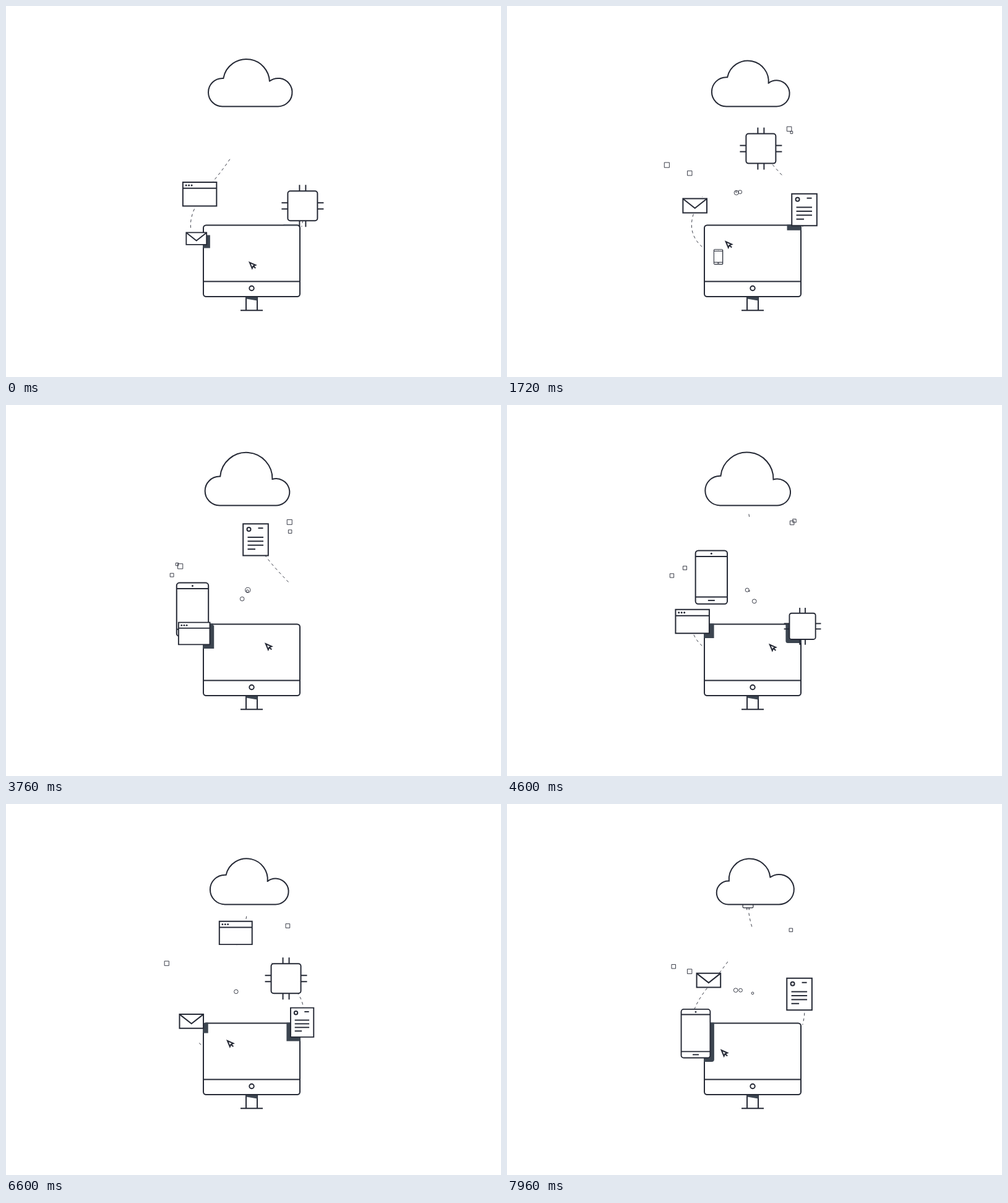
An HTML page with a canvas for the animation above (8 s loop, 800x600 px).

```html
<!DOCTYPE html>
<html lang="en">
<head>
<meta charset="utf-8">
<title>Cloud upload</title>
<style>
  html, body { margin: 0; width: 100%; height: 100%; overflow: hidden; background: #fff; }
  canvas { display: block; width: 800px; height: 600px; }
  svg { position: absolute; width: 0; height: 0; }
</style>
</head>
<body>
<canvas id="stage" width="800" height="600"></canvas>
<svg aria-hidden="true">
  <path id="left-route" d="M361 414Q326 402 309 378C297 361 297 338 306 317C316 292 384 220 390 140"/>
  <path id="right-route" d="M420 413C455 402 473 378 478 356C484 330 482 316 458 288C424 252 384 214 390 140"/>
  <path id="left-trail" d="M330 400C292 378 286 345 324 297C352 262 386 225 390 170"/>
</svg>
<script>
const find = id => document.getElementById(id);
const ctx = find('stage').getContext('2d');
const LOOP = 8000, CYCLE = 5640, TAU = Math.PI * 2;
const INK = '#262a36', SHADE = '#3c4550';

const clamp = v => Math.max(0, Math.min(1, v));
const mix = (a, b, u) => a + (b - a) * u;
const easeInOut = u => u < .5 ? 4 * u ** 3 : 1 - 4 * (1 - u) ** 3;
const since = (phase, start) => (phase - start + 2 * CYCLE) % CYCLE;

// ---- drawing helpers ----
function paint(build, fill) {
  ctx.beginPath();
  build();
  if (fill) { ctx.fillStyle = fill; ctx.fill(); }
  ctx.stroke();
}
const box = (w, h, r) => ctx.roundRect(-w / 2, -h / 2, w, h, r);
const line = (x1, y1, x2, y2) => paint(() => { ctx.moveTo(x1, y1); ctx.lineTo(x2, y2); });
const ring = (x, y, r) => paint(() => ctx.arc(x, y, r, 0, TAU));
function dot(x, y) {
  ctx.beginPath();
  ctx.arc(x, y, 1.5, 0, TAU);
  ctx.fillStyle = INK;
  ctx.fill();
}

// ---- travelling icons: pop out of the screen, drift, then speed up into the cloud ----
const left = { path: find('left-route'), life: 4070, jump: .212, power: 4, side: 1 };
const right = { path: find('right-route'), life: 4233, jump: .257, power: 3, side: -1 };
const DRIFT = .136;

const phone = { start: 1510, route: left, w: 51.4, h: 86.4, r: 4.5, detail() {
  line(-25.7, -33.7, 25.7, -33.7);
  line(-25.7, 32, 25.7, 32);
  line(-5.5, 37.5, 5.5, 37.5);
  dot(0, -38.3);
} };
const browser = { start: 2900, route: left, w: 54.5, h: 38.5, r: 0, detail() {
  line(-27, -9.3, 27, -9.3);
  for (let i = 0; i < 3; i++) dot(-22 + 4.5 * i, -14.2);
} };
const envelope = { start: 4950, route: left, w: 38.6, h: 22.8, r: 0, detail() {
  paint(() => { ctx.moveTo(-19, -11); ctx.lineTo(0, 4); ctx.lineTo(19, -11); });
} };
const chip = { start: 3860, route: right, w: 48, h: 48, r: 4, detail() {
  for (const p of [-5, 5]) for (const s of [-1, 1]) {
    line(p, 24 * s, p, 34 * s);
    line(24 * s, p, 34 * s, p);
  }
} };
const page = { start: 130, route: right, w: 40.6, h: 51.4, r: 0, detail() {
  ring(-11, -16.8, 3);
  line(4, -18.8, 12, -18.8);
  for (let i = 0; i < 4; i++) line(-13, -4 + 6.4 * i, i < 3 ? 12.5 : -.5, -4 + 6.4 * i);
} };
const icons = [phone, browser, envelope, chip, page];

function drawIcon({ route, w, h, r, detail }, age) {
  const { path, life, jump, power, side } = route;
  const pop = 1 - Math.exp(-((age / 450) ** 1.5));
  const scale = pop * clamp((life - age) / 380);
  if (scale < .01) return;
  const u = age / life;
  const progress = jump * pop + DRIFT * u + (1 - jump - DRIFT) * u ** power;
  const { x, y } = path.getPointAtLength(progress * path.getTotalLength());
  const drop = 6.7 * scale ** 2;

  // the shadow falls on the computer only
  ctx.save();
  ctx.beginPath();
  ctx.roundRect(318, 353.5, 158, 117.5, 5);
  ctx.clip();
  ctx.translate(x + side * drop, y + drop);
  ctx.scale(scale, scale);
  ctx.beginPath();
  box(w + 2, h + 2, r);
  ctx.fillStyle = SHADE;
  ctx.fill();
  ctx.restore();

  ctx.save();
  ctx.translate(x, y);
  ctx.scale(scale, scale);
  ctx.lineWidth = 2 / Math.sqrt(scale);
  paint(() => box(w, h, r), '#fff');
  detail();
  ctx.restore();
}

// ---- dashed trails, visible between a rising head and a rising tail ----
const shape = id => new Path2D(find(id).getAttribute('d'));
const leftTrail = {
  path: shape('left-trail'), bottom: 392,
  head: t => 1 - (1 - clamp((t - 900) / 2600)) ** 1.3,
  tail: t => clamp((t - 2200) / 1550),
};
const rightTrail = {
  path: shape('right-route'), bottom: 357,
  head: t => clamp((t - 900) / 3400) ** 1.4,
  tail: t => clamp((t - 2960) / 1700) ** 1.3,
};
const trails = [[leftTrail, 0], [leftTrail, 3230], [rightTrail, 0], [rightTrail, CYCLE - 2170]];

function drawTrail({ path, bottom, head, tail }, age) {
  const top = mix(bottom, 176, head(age)), end = mix(bottom, 176, tail(age));
  if (end <= top) return;
  ctx.save();
  ctx.beginPath();
  ctx.rect(250, top, 300, end - top);
  ctx.clip();
  ctx.setLineDash([4.5, 4.5]);
  ctx.stroke(path);
  ctx.restore();
}

// ---- particles: three clusters of small outlines that swell, drift and vanish ----
function seeded(seed) {
  return () => {
    seed = (seed * 16807) % 2147483647;
    return seed / 2147483647;
  };
}

function cluster(seed, count, x, y, spreadX, spreadY, round) {
  const random = seeded(seed), life = 1600;
  const around = (c, spread) => c + (random() * 2 - 1) * spread;
  return Array.from({ length: count }, (_, i) => ({
    round, life,
    start: mix(650, 5600 - life, i / (count - 1)),
    x: around(x, spreadX), y: around(y, spreadY),
    dx: around(0, 5), dy: around(0, 4),
    size: 3 + 5.5 * random(),
  }));
}

const particles = [
  ...cluster(4801, 5, 468, 196, 14, 12, false),
  ...cluster(7307, 7, 278, 265, 20, 10, false),
  ...cluster(9103, 8, 386, 307, 16, 13, true)];

function drawParticle({ round, life, start, x, y, dx, dy, size }, phase) {
  const age = phase - start;
  if (age <= 0 || age >= life) return;
  const d = size * Math.min(1, age / 350, (life - age) / 200);
  const px = x + dx * age / life, py = y + dy * age / life;
  if (round) ring(px, py, d / 2);
  else paint(() => ctx.rect(px - d / 2, py - d / 2, d, d));
}

// ---- cloud and pointer glide through four evenly spaced poses ----
const poses = [
  { tipX: 393.3, tipY: 414.3, edge: 327, lobe: 22.75, top: 86, notch: 426, end: 462.5, bump: 22.75 },
  { tipX: 353.8, tipY: 379.3, edge: 330.2, lobe: 24, top: 88.5, notch: 422.5, end: 456, bump: 20.75 },
  { tipX: 345, tipY: 400.5, edge: 340, lobe: 18.25, top: 88.5, notch: 426, end: 465, bump: 24.75 },
  { tipX: 428, tipY: 384, edge: 319.5, lobe: 24, top: 75.5, notch: 431, end: 457.5, bump: 21.25 }];

function poseAt(phase) {
  const step = since(phase, -50) / CYCLE * poses.length;
  const i = Math.floor(step), from = poses[i], to = poses[(i + 1) % poses.length];
  const u = easeInOut(step - i);
  return Object.fromEntries(Object.keys(from).map(k => [k, mix(from[k], to[k], u)]));
}

function drawCloud({ edge, lobe, top, notch, end, bump }) {
  const floor = 162.4, quarter = Math.PI / 2;
  const domeLeft = edge + lobe + 1, domeRight = notch;
  const radius = (domeRight - domeLeft) / 2, domeY = top + radius;
  const bumpX = end - bump, bumpY = floor - bump;
  const notchAngle = Math.PI + Math.acos((bumpX - notch) / bump);
  const rise = y => Math.asin(Math.max(-1, Math.min(1, (y - domeY) / radius)));
  paint(() => {
    ctx.arc(edge + lobe, floor - lobe, lobe, quarter, 3 * quarter);
    ctx.arc((domeLeft + domeRight) / 2, domeY, radius,
      Math.PI - rise(floor - 2 * lobe), rise(bumpY + bump * Math.sin(notchAngle)));
    ctx.arc(bumpX, bumpY, bump, notchAngle, quarter);
    ctx.closePath();
  }, '#fff');
}

function drawPointer({ tipX, tipY }) {
  ctx.save();
  ctx.translate(tipX, tipY);
  ctx.stroke(new Path2D('M.5 .5L10 4.7L6.2 6.2L4.5 10Z M6.2 6.2L10 9.8'));
  ctx.restore();
}

function drawMonitor() {
  line(388, 470, 388, 492);
  line(406, 470, 406, 492);
  line(379, 492.3, 415, 492.3);
  ctx.fillStyle = SHADE;
  ctx.fill(new Path2D('M388 470H406V476.5L388 473.5Z'));
  paint(() => ctx.roundRect(319, 354.5, 156, 115.5, 4.5), '#fff');
  line(319, 445.5, 475, 445.5);
  ring(397, 456.5, 3.7);
}

function draw(time) {
  const phase = time % LOOP % CYCLE, pose = poseAt(phase);
  ctx.fillStyle = '#fff';
  ctx.fillRect(0, 0, 800, 600);
  ctx.strokeStyle = INK;

  ctx.lineWidth = .9;
  particles.forEach(p => drawParticle(p, phase));
  trails.forEach(([trail, start]) => drawTrail(trail, since(phase, start)));

  ctx.lineWidth = 2;
  drawMonitor();
  drawPointer(pose);
  icons.map(icon => ({ icon, age: since(phase, icon.start) }))
    .filter(({ icon, age }) => age < icon.route.life)
    .sort((a, b) => b.age - a.age)
    .forEach(({ icon, age }) => drawIcon(icon, age));
  drawCloud(pose);
}

function tick() {
  draw(performance.now());
  requestAnimationFrame(tick);
}
tick();
</script>
</body>
</html>
```
